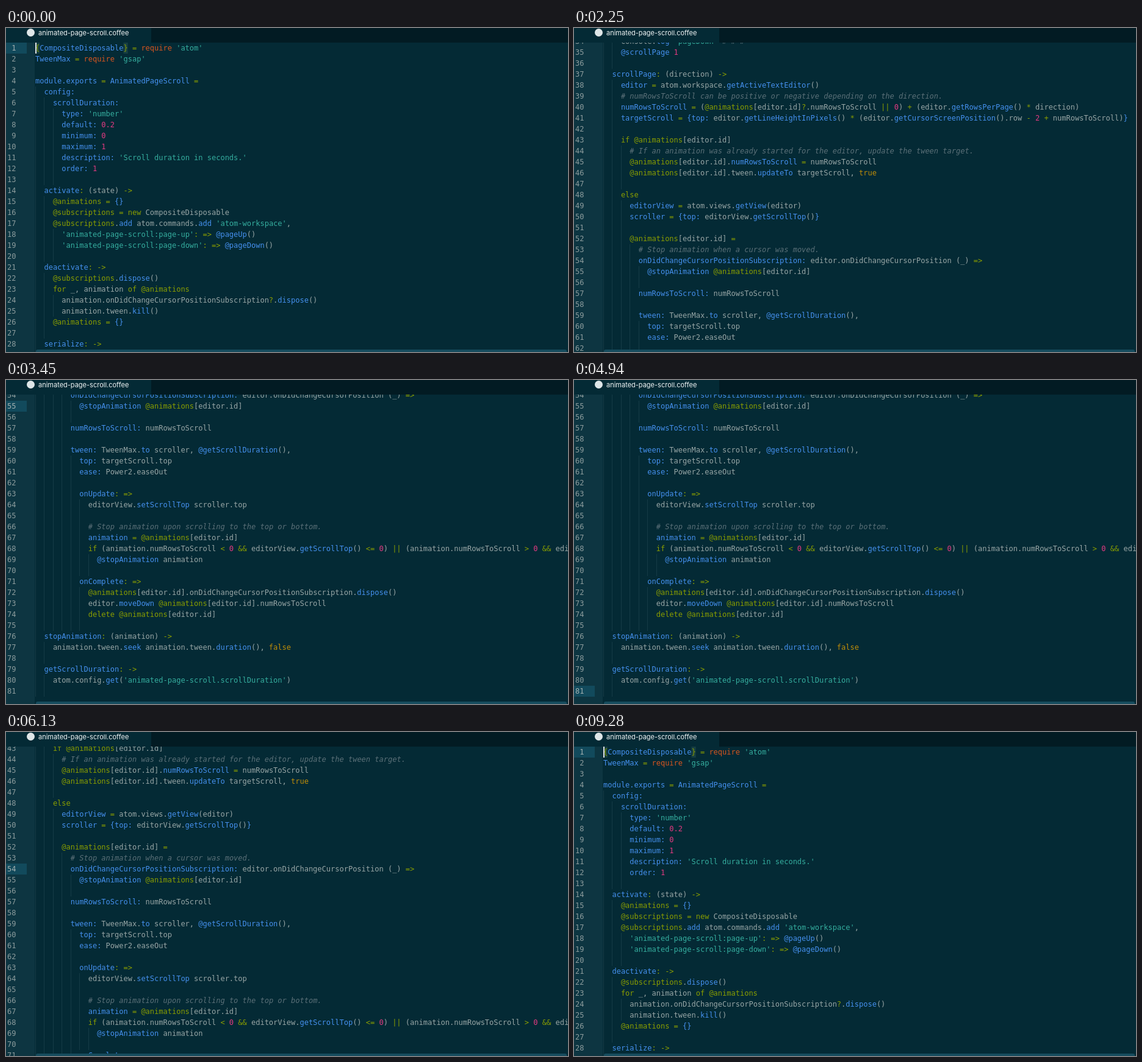
Animation, 921 px wide and 532 px high, one loop 9.38 s. Source, as an HTML page with a canvas:

```html
<!DOCTYPE html>
<html lang="en">
<head>
<meta charset="utf-8">
<title>animated-page-scroll.coffee</title>
<style>
html, body { margin: 0; width: 100%; height: 100%; overflow: hidden; background: #042a35; }
canvas { display: block; }
</style>
</head>
<body>
<canvas id="stage" width="921" height="532"></canvas>
<script>
const W = 921, H = 532, LOOP = 9380, STEP = 150;
const TOP = 24, LINE = 18, LEFT = 48, CHAR = 7.224;
const MONO = '12px "DejaVu Sans Mono", monospace';

const code = `{CompositeDisposable} = require 'atom'
TweenMax = require 'gsap'

module.exports = AnimatedPageScroll =
  config:
    scrollDuration:
      type: 'number'
      default: 0.2
      minimum: 0
      maximum: 1
      description: 'Scroll duration in seconds.'
      order: 1

  activate: (state) ->
    @animations = {}
    @subscriptions = new CompositeDisposable
    @subscriptions.add atom.commands.add 'atom-workspace',
      'animated-page-scroll:page-up': => @pageUp()
      'animated-page-scroll:page-down': => @pageDown()

  deactivate: ->
    @subscriptions.dispose()
    for _, animation of @animations
      animation.onDidChangeCursorPositionSubscription?.dispose()
      animation.tween.kill()
    @animations = {}

  serialize: ->

  pageUp: ->
    @scrollPage -1

  pageDown: ->
    console.log 'pageDown' # # #
    @scrollPage 1

  scrollPage: (direction) ->
    editor = atom.workspace.getActiveTextEditor()
    # numRowsToScroll can be positive or negative depending on the direction.
    numRowsToScroll = (@animations[editor.id]?.numRowsToScroll || 0) + (editor.getRowsPerPage() * direction)
    targetScroll = {top: editor.getLineHeightInPixels() * (editor.getCursorScreenPosition().row - 2 + numRowsToScroll)}

    if @animations[editor.id]
      # If an animation was already started for the editor, update the tween target.
      @animations[editor.id].numRowsToScroll = numRowsToScroll
      @animations[editor.id].tween.updateTo targetScroll, true

    else
      editorView = atom.views.getView(editor)
      scroller = {top: editorView.getScrollTop()}

      @animations[editor.id] =
        # Stop animation when a cursor was moved.
        onDidChangeCursorPositionSubscription: editor.onDidChangeCursorPosition (_) =>
          @stopAnimation @animations[editor.id]

        numRowsToScroll: numRowsToScroll

        tween: TweenMax.to scroller, @getScrollDuration(),
          top: targetScroll.top
          ease: Power2.easeOut

          onUpdate: =>
            editorView.setScrollTop scroller.top

            # Stop animation upon scrolling to the top or bottom.
            animation = @animations[editor.id]
            if (animation.numRowsToScroll < 0 && editorView.getScrollTop() <= 0) || (animation.numRowsToScroll > 0 && editorView.getScrollTop() >= 0)
              @stopAnimation animation

          onComplete: =>
            @animations[editor.id].onDidChangeCursorPositionSubscription.dispose()
            editor.moveDown @animations[editor.id].numRowsToScroll
            delete @animations[editor.id]

  stopAnimation: (animation) ->
    animation.tween.seek animation.tween.duration(), false

  getScrollDuration: ->
    atom.config.get('animated-page-scroll.scrollDuration')
`.split('\n');

const GREY = '#98a6a6', BLUE = '#4590ee', GREEN = '#8a9e00', CYAN = '#35ae9f',
  PINK = '#e23a82', ORANGE = '#d9561f', YELLOW = '#c08e08', COMMENT = '#5b7078';

// First matching rule wins.
const rules = [
  [/#.*/y, COMMENT],
  [/'[^']*'/y, CYAN],
  [/\{(?=C)|(?<=e)\}/y, GREEN],
  [/\w+(?=: (\([^)]*\) )?[-=]>)/y, BLUE],
  [/[A-Za-z]\w*:/y, BLUE],
  [/[A-Za-z][\w.]*(?= =)/y, BLUE],
  [/\w+(?=\} =)/y, BLUE],
  [/@\w+(?=[.\[]| =|$)/y, GREEN],
  [/@\w+/y, BLUE],
  [/(if|for|of|new|else|delete)\b/y, GREEN],
  [/require\b/y, ORANGE],
  [/(true|false)\b/y, YELLOW],
  [/\d[\d.]*/y, PINK],
  [/(?<=\.)\w+(?=\(| [\w@'])/y, BLUE],
  [/\w+/y, GREY],
  [/[-+*=<>|&?:]+/y, GREEN],
  [/[{}]+/y, BLUE],
  [/\s+/y, null],
  [/./y, GREY]
];

function tokenize(text) {
  const tokens = [];
  for (let col = 0; col < text.length;) {
    for (const [re, color] of rules) {
      re.lastIndex = col;
      const m = re.exec(text);
      if (!m) continue;
      if (color) tokens.push({ col, color, text: m[0] });
      col += m[0].length;
      break;
    }
  }
  return tokens;
}

const depth = text => text.search(/\S/) / 2;

// Blank lines take the deeper indent of their neighbours.
function guides(i) {
  if (code[i]) return depth(code[i]);
  const above = code.slice(0, i).reverse().find(Boolean) || 'x';
  const below = code.slice(i).find(Boolean) || 'x';
  return Math.max(depth(above), depth(below));
}

const lines = code.map((text, i) => ({ tokens: tokenize(text), guides: guides(i) }));

// [time, scroll top, cursor row]
const moves = [
  [0, 0, 1],
  [1200, 150, 1], [1350, 449, 1], [1500, 450, 28],
  [2250, 605, 28], [2400, 935, 28], [2550, 936, 55],
  [3450, 962, 55], [3600, 962, 81],
  [5090, 938, 81], [5240, 918, 81], [5390, 918, 54],
  [6130, 762, 54], [6280, 433, 54], [6430, 432, 27],
  [7330, 144, 27], [7480, 0, 1]
];

const LONG = [0.6, 0.1, 0, 0.5, 1], SHORT = [0.5, 0, 0.5, 1], OUT = [0.5, 0];
const blinks = [
  [150, LONG], [1050, OUT], [1950, OUT], [3150, OUT], [4050, SHORT],
  [4790, OUT], [5830, OUT], [6880, OUT], [7930, LONG], [8830, SHORT]
];

const last = (list, t) => list.filter(item => item[0] <= t).pop();

function cursorAlpha(t, row) {
  const blink = last(blinks, t);
  if (!blink) return 1;
  const arrived = moves.find(m => m[2] === row && m[0] <= t && (row > 1 || m[0] > 7000 || t < 7480));
  if (arrived[0] > blink[0]) return 1;
  const i = Math.floor((t - blink[0]) / STEP);
  return blink[1][Math.min(i, blink[1].length - 1)];
}

const ctx = document.getElementById('stage').getContext('2d');

function rect(color, x, y, w, h) {
  ctx.fillStyle = color;
  ctx.fillRect(x, y, w, h);
}

function label(text, x, y, color, font) {
  ctx.font = font;
  ctx.fillStyle = color;
  ctx.fillText(text, x, y);
}

function drawLine(i, y, row) {
  const active = i + 1 === row, line = lines[i], num = String(i + 1);
  if (active) rect('#124a5c', 0, y, 34, LINE);
  label(num, 16.4 - num.length * CHAR, y + 13, active ? '#a3b1b1' : '#8c9c9d', MONO);
  for (let g = 0; g < line.guides; g++) {
    rect('#153b46', Math.round(LEFT + g * 2 * CHAR), y, 1, LINE);
  }
  if (active && row === 1) {
    for (const col of [0, 20]) rect('#173f42', LEFT + col * CHAR, y, CHAR, LINE);
  }
  for (const { col, color, text } of line.tokens) {
    label(text, LEFT + col * CHAR, y + 13, color, color === COMMENT ? 'italic ' + MONO : MONO);
  }
}

function drawTabs() {
  rect('#021b23', 0, 0, W, TOP);
  rect('#042a35', 0, 0, 238, TOP);
  ctx.fillStyle = '#dfe6e8';
  ctx.beginPath();
  ctx.arc(40.5, 7.5, 6.5, 0, Math.PI * 2);
  ctx.fill();
  label('animated-page-scroll.coffee', 53, 12, '#f2f5f5', '11px Inter, sans-serif');
}

function draw(t) {
  const [, scroll, row] = last(moves, t);
  rect('#042a35', 0, 0, W, H);
  rect('#0d3541', 0, TOP, 47, H - TOP);

  const first = Math.floor(scroll / LINE);
  for (let i = first; i < lines.length && i < first + 30; i++) {
    drawLine(i, TOP + i * LINE - scroll, row);
  }

  ctx.globalAlpha = cursorAlpha(t, row);
  rect('#dfe5e5', LEFT, TOP + (row - 1) * LINE - scroll, 2, LINE);
  ctx.globalAlpha = 1;

  ctx.fillStyle = '#164c5e';
  ctx.beginPath();
  ctx.roundRect(49, 528, 870, 8, 3);
  ctx.fill();
  drawTabs();
}

const start = performance.now();
function tick() {
  draw((performance.now() - start) % LOOP);
  requestAnimationFrame(tick);
}
tick();
</script>
</body>
</html>
```
